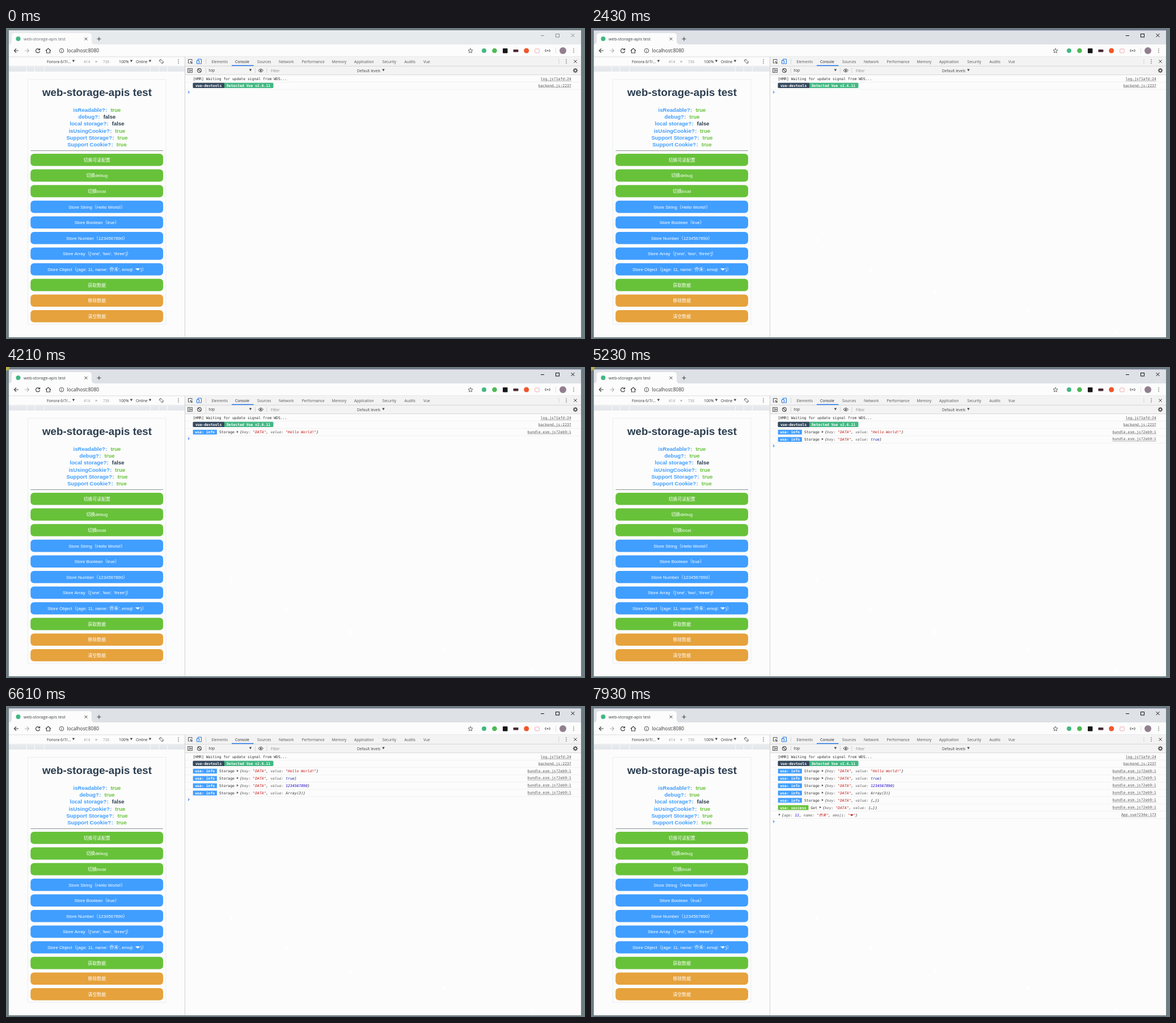
An HTML page with a canvas for the animation above (8 s loop, 1021 by 549 pixels).

```html
<!DOCTYPE html>
<html lang="zh-CN">
<head>
<meta charset="utf-8">
<title>web-storage-apis test</title>
<style>
html, body { margin: 0; width: 100%; height: 100%; overflow: hidden; background: #6e7d82; }
canvas { display: block; }
</style>
</head>
<body>
<canvas id="stage" width="1021" height="549"></canvas>
<script>
const c = document.getElementById('stage').getContext('2d');
const LOOP = 8000;
const UI = "'Open Sans', 'Noto Sans', sans-serif";
const ARIAL = "'Liberation Sans', 'Noto Sans CJK SC', 'DejaVu Sans', sans-serif";
const MONO = "'DejaVu Sans Mono', 'Noto Sans CJK SC', 'DejaVu Sans', monospace";
const GREEN = '#67c23a', BLUE = '#409eff', ORANGE = '#e6a23c', INK = '#2c3e50';
const HEART = '\u2764\uFE0E';

// y is the middle of the capitals; returns the x where the text ends
function text(s, x, y, size, color, { family = UI, style = '', align = 'left' } = {}) {
  c.font = `${style} ${size}px ${family}`;
  c.fillStyle = color;
  c.textAlign = align;
  c.fillText(s, x, y + size * 0.36);
  return x + c.measureText(s).width;
}
function rect(x, y, w, h, color) {
  c.fillStyle = color;
  c.fillRect(x, y, w, h);
}
function round(x, y, w, h, r, color) {
  c.beginPath();
  c.roundRect(x, y, w, h, r);
  c.fillStyle = color;
  c.fill();
}
function disc(x, y, r, color) {
  c.beginPath();
  c.arc(x, y, r, 0, 7);
  c.fillStyle = color;
  c.fill();
}
function ring(x, y, r, color, width = 1) {
  c.beginPath();
  c.arc(x, y, r, 0, 7);
  c.strokeStyle = color;
  c.lineWidth = width;
  c.stroke();
}
function path(d, x, y, color, width = 1, fill = false) {
  c.save();
  c.translate(x, y);
  c.lineWidth = width;
  c.strokeStyle = c.fillStyle = color;
  const p = new Path2D(d);
  fill ? c.fill(p) : c.stroke(p);
  c.restore();
}
const dots = (x, y) => [-3, 0, 3].forEach(d => disc(x, y + d, 0.8, '#555'));
const caret = (x, y) => path('M-2.2 -2h4.4l-2.2 4z', x, y, '#444', 1, true);
const cross = (x, y, r, color) => path(`M${-r} ${-r}L${r} ${r}M${r} ${-r}L${-r} ${r}`, x, y, color);

function drawWindow(active) {
  const dark = active ? '#111' : '#8b8d90';
  rect(0, 0, 1021, 549, '#6e7d82');
  rect(5, 4, 1009, 542, '#fcfcfc');
  rect(5, 4, 1009, 25, active ? '#dee1e6' : '#e7eaed');
  if (active) rect(5, 4, 1009, 1, '#c3bbe4');
  path('M4 29Q10 29 10 23V14Q10 9 15 9H146Q151 9 151 14V23Q151 29 157 29Z', 0, 0, '#fcfcfc', 1, true);
  disc(21.5, 19, 4, '#41b883');
  text('web-storage-apis test', 31, 19.5, 7.4, active ? '#3c4043' : '#686b70');
  cross(141, 19.3, 2.4, '#444');
  path('M-3.5 0H3.5M0 -3.5V3.5', 164, 19.3, '#444', 1.1);
  path('M-3 0H3', 946, 13.5, dark);
  c.lineWidth = 1;
  c.strokeStyle = dark;
  c.strokeRect(969.5, 10.5, 6, 5.5);
  cross(999.5, 13, 3, dark);
  drawAddressBar();
}

function drawAddressBar() {
  path('M4 0H-3.5M0 -3.5L-3.5 0L0 3.5', 18, 40, '#444', 1.2);
  path('M-4 0H3.5M0 -3.5L3.5 0L0 3.5', 37, 40, '#b5b5b5', 1.2);
  path('M3 -2A3.6 3.6 0 1 0 3.6 1M3.6 -4V-1.3H.8', 56, 40, '#444', 1.2);
  path('M-4.5 0L0 -4L4.5 0M-3 -.8V4H3V-.8', 74.5, 40, '#444', 1.2);
  ring(98, 40, 3.8, '#555');
  path('M0 -2.2V-1.2M0 -.3V2.3', 98, 40, '#555');
  text('localhost:8080', 107.5, 40, 8.4, '#333');
  path('M0 -4L1.2 -1.3L4 -1L1.9 1L2.5 3.8L0 2.3L-2.5 3.8L-1.9 1L-4 -1L-1.2 -1.3Z', 819, 40, '#555', 0.9);
  disc(843, 40, 4, '#41b883');
  disc(861.5, 40, 4.3, '#4fb955');
  round(876, 36, 8.5, 8.5, 1, '#151515');
  round(894.5, 38, 9, 4.5, 1, '#4a2a35');
  disc(917.7, 40, 4.5, '#f0562b');
  c.beginPath();
  c.roundRect(932.7, 37, 7.6, 6.8, 1.5);
  c.strokeStyle = '#f3a4ae';
  c.stroke();
  disc(955, 40, 1.1, '#444');
  path('M-2.3 -2A3 3 0 0 0 -2.3 2M2.3 -2A3 3 0 0 1 2.3 2M-3.5 -2.6A4 4 0 0 0 -3.5 2.6M3.5 -2.6A4 4 0 0 1 3.5 2.6', 955, 40, '#555', 0.7);
  rect(969, 35, 1, 10, '#ddd');
  disc(982, 40, 6, '#927f8e');
  dots(1001, 40);
  rect(5, 50.5, 1009, 0.8, '#d4d6d9');
}

function drawDeviceBar() {
  text('Fonora 6/7/...', 72, 59.2, 6.8, '#333');
  caret(119, 58.5);
  text('414', 137, 59.2, 6.6, '#999');
  text('×', 157, 59.2, 7.5, '#777');
  text('736', 171, 59.2, 6.6, '#999');
  text('100%', 199, 59.2, 6.8, '#333');
  caret(221, 58.5);
  text('Online', 229, 59.2, 6.7, '#333');
  caret(254, 58.5);
  c.save();
  c.translate(274, 59);
  c.rotate(-Math.PI / 4);
  c.strokeStyle = '#666';
  c.lineWidth = 0.9;
  c.strokeRect(-1.7, -3, 3.4, 6);
  c.restore();
  path('M-4 0A4 4 0 0 1 0 -4M4 0A4 4 0 0 1 0 4', 274, 59, '#777', 0.8);
  dots(304, 59);
  rect(5, 67, 310, 0.7, '#ddd');
  rect(5, 68.5, 310, 8.5, '#e5e8ec');
  for (const x of [36, 50, 67, 254, 269, 284]) rect(x, 68.5, 1, 8.5, '#fafafa');
}

const buttons = [
  ['切换可读配置', GREEN], ['切换debug', GREEN], ['切换local', GREEN],
  ['Store String（Hello World!）', BLUE], ['Store Boolean（true）', BLUE],
  ['Store Number（1234567890）', BLUE], ["Store Array（['one', 'two', 'three']）", BLUE],
  [`Store Object（{age: 11, name: '乔禾', emoji: '${HEART}'}）`, BLUE],
  ['获取数据', GREEN], ['移除数据', ORANGE], ['清空数据', ORANGE]
];

function drawPage(debug) {
  c.strokeStyle = '#ebedef';
  c.lineWidth = 1;
  c.strokeRect(38.5, 90.5, 243.5, 432.5);
  text('web-storage-apis test', 160.5, 113.5, 18.8, INK, { family: ARIAL, style: 'bold', align: 'center' });
  const flags = [['isReadable', true], ['debug', debug], ['local storage', false],
    ['isUsingCookie', true], ['Support Storage', true], ['Support Cookie', true]];
  const bold = { family: ARIAL, style: 'bold' }, size = 9.55;
  flags.forEach(([name, on], i) => {
    const y = 144.3 + i * 12.33, label = name + '?', value = String(on);
    c.font = `bold ${size}px ${ARIAL}`;
    const w = c.measureText(label).width + size + c.measureText(value).width;
    const end = text(label, 160.5 - w / 2, y, size, BLUE, bold);
    text(':', end + 0.5, y, size, BLUE, bold);
    text(value, end + size, y, size, on ? GREEN : INK, bold);
  });
  rect(43.5, 216, 233.5, 0.9, '#7d8a88');
  buttons.forEach(([label, color], i) => {
    const y = 222 + i * 27.6;
    round(43.3, y, 233.8, 21.6, 6, color);
    text(label, 160.3, y + 11, 7.87, '#fff', { family: ARIAL, style: '500', align: 'center' });
  });
}

function drawTools() {
  rect(315, 51, 699, 32, '#f3f3f3');
  rect(315, 51, 0.9, 495, '#cfcfcf');
  rect(315, 66.8, 699, 0.8, '#cdcdcd');
  rect(315, 82.3, 699, 0.8, '#d2d2d2');
  path('M3 -1V-3.5H-3.5V3H-1M0 0L4 1.5L2 2.2L3.7 4L2 2.2L1.4 4Z', 325, 59, '#555', 1);
  path('M-2 -1.5V-4H4V4H1M-4 -1.5H0V4H-4Z', 340.5, 59, '#1a73e8', 1);
  rect(352, 54.5, 0.8, 9, '#ccc');
  const tabs = [['Elements', 362.5], ['Console', 404], ['Sources', 443], ['Network', 481], ['Performance', 521.5],
    ['Memory', 574.5], ['Application', 614], ['Security', 663.5], ['Audits', 702.5], ['Vue', 736]];
  for (const [name, x] of tabs) text(name, x, 59.3, 6.65, name === 'Console' ? '#222' : '#555');
  rect(398, 65.6, 38.5, 1.4, '#1a73e8');
  rect(974.5, 54.5, 0.8, 9, '#ccc');
  dots(988, 59);
  cross(1004, 59, 2.7, '#444');

  c.strokeStyle = '#555';
  c.lineWidth = 0.9;
  c.strokeRect(320.5, 71.5, 8, 7);
  path('M-1.5 -3.5V3.5M.5 -1.7L3 0L.5 1.7Z', 324.5, 75, '#555', 0.9);
  ring(341, 75, 3.4, '#444', 1.1);
  path('M-2.4 -2.4L2.4 2.4', 341, 75, '#444', 1.1);
  for (const x of [352, 439, 459.5]) rect(x, 70.5, 0.8, 9, '#ccc');
  text('top', 357.5, 75, 6.8, '#333');
  caret(431, 74.5);
  path('M-4.2 0Q0 -5.6 4.2 0Q0 5.6 -4.2 0Z', 449.3, 75, '#444', 1);
  disc(449.3, 75, 1.5, '#444');
  text('Filter', 467, 75.2, 6.7, '#8c8c8c');
  text('Default levels', 619, 75.2, 6.6, '#444');
  caret(665.5, 74.5);
  ring(1004, 75, 2.4, '#555', 1.6);
  for (let a = 0; a < 8; a++) {
    const u = Math.cos(a * Math.PI / 4), v = Math.sin(a * Math.PI / 4);
    path(`M${u * 3} ${v * 3}L${u * 4.2} ${v * 4.2}`, 1004, 75, '#555', 1.4);
  }
}

const KEY = '#606060', STR = '#c41a16', NUM = '#1c00cf', OBJ = '#333', M = 6.41;
const entry = (value, color) => [['{', OBJ], ['key: ', KEY], ['"DATA"', STR], [', ', OBJ], ['value: ', KEY], [value, color], ['}', OBJ]];
// each log: time, badge, word, preview, link
const logs = [
  [2960, 'info', 'Storage', entry('"Hello World!"', STR)],
  [4360, 'info', 'Storage', entry('true', '#0d22aa')],
  [5310, 'info', 'Storage', entry('1234567890', NUM)],
  [6230, 'info', 'Storage', entry('Array(3)', OBJ)],
  [7070, 'info', 'Storage', entry('{…}', OBJ)],
  [7930, 'success', 'Get', entry('{…}', OBJ)],
  [7930, '', '', [['{', OBJ], ['age: ', KEY], ['11', NUM], [', ', OBJ], ['name: ', KEY], ['"乔禾"', STR],
    [', ', OBJ], ['emoji: ', KEY], [`"${HEART}"`, STR], ['}', OBJ]], 'App.vue?234e:173']
];
const mono = (s, x, y, color, style = '') => text(s, x, y, M, color, { family: MONO, style });
const rule = y => rect(316, y, 698, 0.7, '#ececec');

function link(s, y) {
  text(s, 996.7, y, M, '#545454', { family: MONO, align: 'right' });
  const w = c.measureText(s).width;
  rect(996.7 - w, y + 3.4, w, 0.6, '#777');
}

function drawLog([, kind, word, preview, href = 'bundle.esm.js?2eb9:1'], i) {
  const y = 115 + i * 12.87;
  let x = 332;
  if (kind) {
    const label = 'wsa: ' + kind, w = label.length * M * 0.602 + 7.5;
    rect(329.7, y - 4.2, w, 8.4, kind === 'info' ? BLUE : GREEN);
    mono(label, 333.4, y, '#fff', 'bold');
    x = mono(word, 329.7 + w + 4, y, '#303030') + 5;
  }
  path('M-1 -2L2 0L-1 2Z', x, y - 0.5, '#555', 1, true);
  x += 4.3;
  for (const [s, color] of preview) x = mono(s, x, y, color, 'italic');
  link(href, y - 0.7);
  rule(y + 6);
}

function drawConsole(t) {
  mono('[HMR] Waiting for update signal from WDS...', 329.5, 89.7, '#303030');
  link('log.js?1afd:24', 89.5);
  rule(95.2);
  round(329.5, 96.8, 55.5, 9.2, [1.5, 0, 0, 1.5], '#35495e');
  round(385, 96.8, 86.5, 9.2, [0, 1.5, 1.5, 0], '#41b883');
  mono('vue-devtools', 334, 101.4, '#fff', 'bold');
  mono('Detected Vue v2.6.11', 389, 101.4, '#fff', 'bold');
  link('backend.js:2237', 101.2);
  rule(107.8);
  const shown = logs.filter(l => t >= l[0]);
  shown.forEach(drawLog);
  path('M-1 -2L1.2 0L-1 2', 322, 113.3 + shown.length * 12.95, '#3b82f6', 1.1);
}

// stops of the arrow on its way in; the white of each stop stays behind
const stops = [[70, 923, 531], [130, 769, 492], [190, 604, 462], [260, 491, 420], [430, 395, 368]];
const ARROW = 'M0 0L0 9.2L2.2 7.3L3.6 10.4L5 9.8L3.6 6.8L6.3 6.5Z';

function drawPointer(t) {
  const passed = stops.filter(s => t >= s[0]);
  passed.forEach(([, x, y], i) => {
    if (i === passed.length - 1 && t < 580) path(ARROW, x, y, '#222', 1);
    path(ARROW, x + 0.5, y + 0.5, '#fff', 1, true);
  });
  if (t >= 2960 && t < 3280) {
    const g = c.createRadialGradient(195, 319.5, 1, 195, 319.5, 6.5);
    g.addColorStop(0, 'rgba(48,66,92,.85)');
    g.addColorStop(0.7, 'rgba(48,66,92,.75)');
    g.addColorStop(1, 'rgba(48,66,92,0)');
    disc(195, 319.5, 6.5, g);
  }
}

const presses = [[1970, 2050], [2880, 2960], [4210, 4360], [5230, 5310], [6150, 6230], [7000, 7070], [7850, 7930]];

function draw(t) {
  drawWindow(t >= 1970);
  drawDeviceBar();
  drawPage(t >= 2050);
  drawTools();
  drawConsole(t);
  drawPointer(t);
  if (presses.some(([on, off]) => t >= on && t < off)) disc(0, 0, 6.5, '#b9b04a');
}

let start;
function tick(now) {
  start ??= now;
  draw((now - start) % LOOP);
  requestAnimationFrame(tick);
}
draw(0);
requestAnimationFrame(tick);
</script>
</body>
</html>
```
